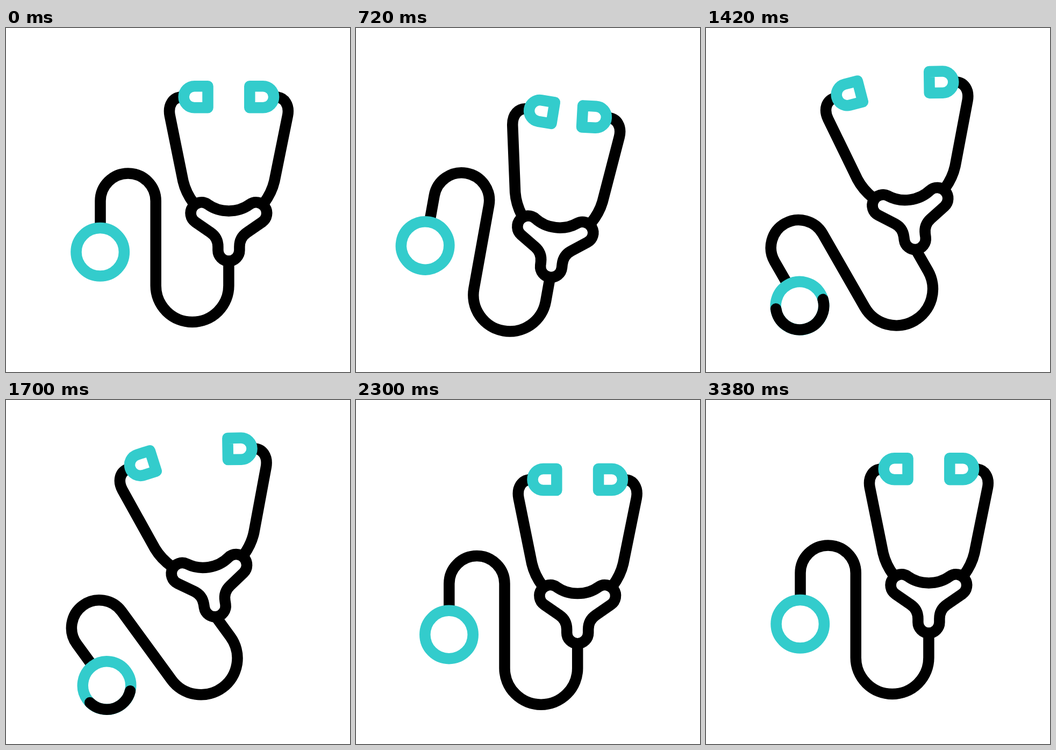
An HTML page for the animation above (3.6 s loop, 640 by 640 pixels).

```html
<!DOCTYPE html>
<html lang="en">
<head>
<meta charset="utf-8">
<title>Stethoscope</title>
<style>
  html, body { margin: 0; width: 100%; height: 100%; overflow: hidden; background: #fff; }
  svg { display: block; width: 100vw; height: 100vh; }
  path, circle { fill: none; stroke: #000; stroke-width: 20.5; stroke-linejoin: round; }
  .teal { stroke: #33cccc; }
  #arc { stroke-linecap: round; }
</style>
</head>
<body>
<svg viewBox="0 0 640 640">
  <g id="body">
    <g id="tube">
      <path d="M175.5 370V322A51.6 51.6 0 0 1 278.7 322V479.2A67.85 67.85 0 0 0 414.4 479.2V430"/>
      <circle class="teal" cx="175.2" cy="416.8" r="44.7"/>
      <path id="arc"/>
    </g>
    <g id="left">
      <g id="arm">
        <path d="M349 326C338 311 333 300 329.5 285L304.8 163C301 143 311 129 326 128.5"/>
        <path class="teal" d="M375.5 108.2V148.3H350.7A20.05 20.05 0 0 1 350.7 108.2Z"/>
      </g>
    </g>
    <g id="right"><use href="#arm" transform="matrix(-1 0 0 1 828.8 0)"/></g>
    <path d="M375.2 328C398 344.5 431 344.5 453.6 328A20 20 0 1 1 476.6 361L448.3 380.5C438.8 387 434.4 396 434.4 407V413.5A20 20 0 0 1 394.4 413.5V407C394.4 396 390 387 380.5 380.5L352.2 361A20 20 0 1 1 375.2 328Z"/>
  </g>
</svg>
<script>
const LOOP = 3600;
const HINGE = [414.4, 436.5];
const LOBE_L = [363, 344];
const LOBE_R = [465.8, 344];
const RING = { x: 175.2, y: 416.8, r: 44.7 };
const PEAK_1 = 1310, PEAK_2 = 1765;

// Full strength of each move; angles are measured against the stage
const WIND_UP = { x: -55.6, y: 9.7, yoke: 6.4, tube: 10.2, left: 9.2, right: 3.1 };
const SWING = { x: -25, y: -56.5, yoke: -10, tube: -40, left: -19.5, right: -1 };
const SETTLE = { x: 1.5, y: 0, yoke: -1, tube: -0.45, left: -1.8, right: 0 };
const CROUCH = 20.5;
const SWAY = 4;

const $ = id => document.getElementById(id);
const wave = u => (1 - Math.cos(Math.PI * u)) / 2;
const clamp = u => Math.min(1, Math.max(0, u));

function pose(t) {
  const ease = (from, to) => wave(clamp((t - from) / (to - from)));
  const rise = ease(100, 610);
  const leap = ease(860, PEAK_1);
  const crouch = rise * (1 - ease(2200, 3000));
  const settle = ease(2300, 2700) * (1 - ease(2750, 3300));

  // The swing peaks twice with a dip between, then lets go
  const dip = wave(2 * clamp((t - PEAK_1) / (PEAK_2 - PEAK_1)));
  const swing = leap * (1 - 0.53 * dip) * (1 - ease(PEAK_2, 2166));

  const p = {};
  for (const k in SWING) {
    const wind = (k === "x" ? ease(100, 800) : rise) * (1 - leap);
    p[k] = WIND_UP[k] * wind + SWING[k] * swing + SETTLE[k] * settle;
  }
  p.x += SWAY * leap * crouch * Math.sin(2 * Math.PI * (t - 1680) / 1040);
  p.y += CROUCH * crouch;
  return p;
}

const turn = (angle, [x, y]) => `rotate(${angle.toFixed(3)} ${x} ${y})`;

function ringPoint(deg) {
  const a = deg * Math.PI / 180;
  return `${(RING.x + RING.r * Math.cos(a)).toFixed(2)} ${(RING.y + RING.r * Math.sin(a)).toFixed(2)}`;
}

// Dark arc that spreads from the bottom of the ring and draws back
function arcPath(t, tubeAngle) {
  const u = (t - 940) / 980;
  if (u <= 0 || u >= 1) return "";
  const span = 188 * Math.sin(Math.PI * u);
  const mid = 87 - 17 * u - tubeAngle;
  const big = span > 180 ? 1 : 0;
  return `M${ringPoint(mid - span / 2)}A${RING.r} ${RING.r} 0 ${big} 1 ${ringPoint(mid + span / 2)}`;
}

function draw(t) {
  const { x, y, yoke, tube, left, right } = pose(t);
  $("body").setAttribute("transform", `translate(${x.toFixed(3)} ${y.toFixed(3)}) ${turn(yoke, HINGE)}`);
  $("tube").setAttribute("transform", turn(tube - yoke, HINGE));
  $("left").setAttribute("transform", turn(left - yoke, LOBE_L));
  $("right").setAttribute("transform", turn(right - yoke, LOBE_R));
  $("arc").setAttribute("d", arcPath(t, tube));
}

const start = performance.now();
function tick() {
  draw((performance.now() - start) % LOOP);
  requestAnimationFrame(tick);
}
draw(0);
requestAnimationFrame(tick);
</script>
</body>
</html>
```
